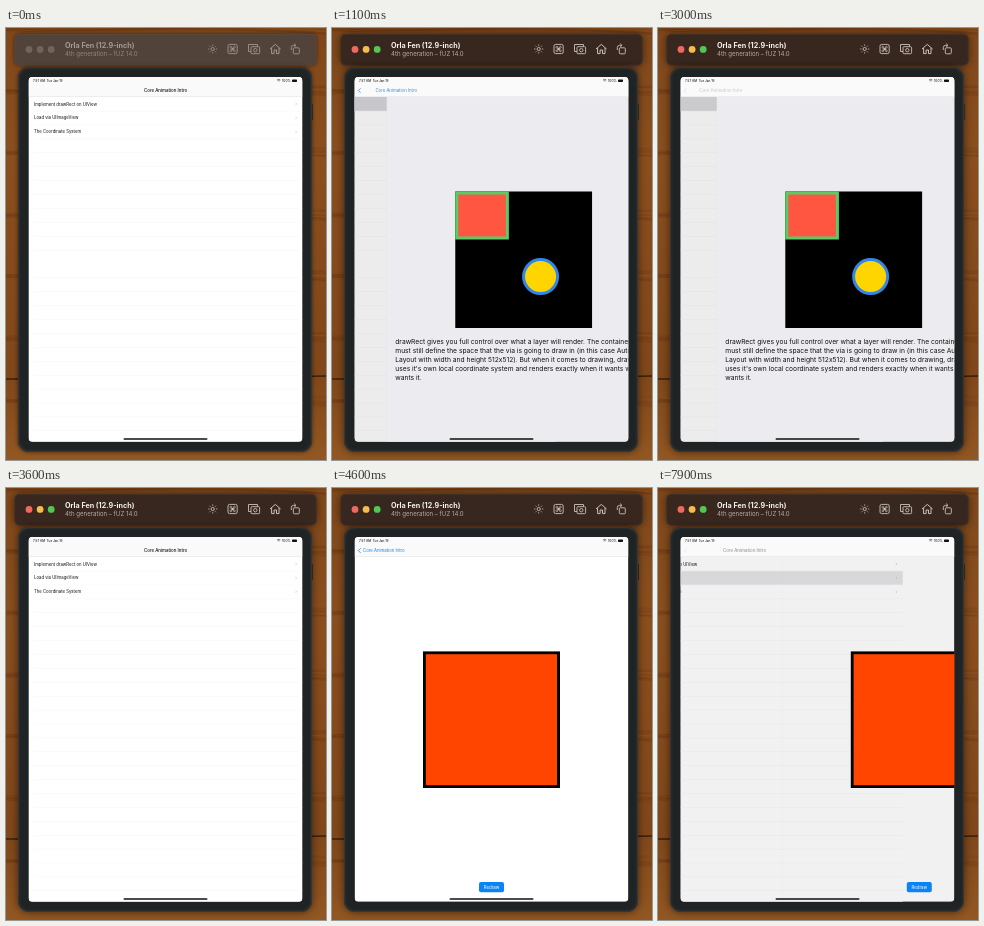
These frames come from a looping animation (320x432 px, 8000 ms). An HTML page with a canvas:

```html
<!DOCTYPE html>
<html lang="en">
<head>
<meta charset="utf-8">
<title>Tablet simulator</title>
<style>
html, body { margin: 0; width: 100%; height: 100%; overflow: hidden; background: #70430f; }
canvas { display: block; width: 320px; height: 432px; }
</style>
</head>
<body>
<canvas></canvas>
<script>
const W = 320, H = 432, LOOP = 8000, STEP = 100;
const SCREEN = { x: 22.6, y: 49, w: 273.8, h: 364.8 };
const NAV_BOTTOM = 69, ROW = 13.9;
const ROWS = ['Implement drawRect on UIView', 'Load via UIImageView', 'The Coordinate System'];
const PARAGRAPH = [
  'drawRect gives you full control over what a layer will render. The container',
  'must still define the space that the via is going to draw in (in this case Auto',
  'Layout with width and height 512x512). But when it comes to drawing, drawRect',
  "uses it's own local coordinate system and renders exactly when it wants what it",
  'wants it.'
];
const VISITS = [
  { row: 0, push: 895, pop: 2965, draw: drawShapes },
  { row: 1, push: 4095, pop: 7828, draw: drawImagePage }
];
const PRESSES = [[5000, 5200], [5600, 5800], [6400, 6500]];

const canvas = document.querySelector('canvas');
const scale = window.devicePixelRatio || 1;
canvas.width = W * scale;
canvas.height = H * scale;
const c = canvas.getContext('2d');

const spring = ms => {
  const x = Math.max(0, ms) * 0.018;
  return 1 - (1 + x) * Math.exp(-x);
};

function rect(x, y, w, h, fill) {
  c.fillStyle = fill;
  c.fillRect(x, y, w, h);
}

function round(x, y, w, h, r, fill, stroke, line = 1) {
  c.beginPath();
  c.roundRect(x, y, w, h, r);
  paint(fill, stroke, line);
}

function circle(x, y, r, fill, stroke, line = 1) {
  c.beginPath();
  c.arc(x, y, r, 0, 7);
  paint(fill, stroke, line);
}

function path(d, stroke, line = 1) {
  c.strokeStyle = stroke;
  c.lineWidth = line;
  c.stroke(new Path2D(d));
}

function paint(fill, stroke, line) {
  if (fill) { c.fillStyle = fill; c.fill(); }
  if (stroke) { c.strokeStyle = stroke; c.lineWidth = line; c.stroke(); }
}

function text(s, x, y, size, fill, weight = 400, align = 'left') {
  c.font = `${weight} ${size}px Inter, sans-serif`;
  c.textAlign = align;
  c.fillStyle = fill;
  c.fillText(s, x, y);
}

function withAlpha(alpha, draw) {
  c.save();
  c.globalAlpha *= Math.max(0, Math.min(1, alpha));
  draw();
  c.restore();
}

function withShadow(blur, draw) {
  c.save();
  c.shadowColor = 'rgba(0,0,0,.55)';
  c.shadowBlur = blur * scale;
  draw();
  c.restore();
}

function at(x, y, draw) {
  c.save();
  c.translate(x, y);
  draw();
  c.restore();
}

function drawDesk() {
  const g = c.createLinearGradient(0, 0, 0, H);
  g.addColorStop(0, '#80481a');
  g.addColorStop(0.3, '#8a4f1e');
  g.addColorStop(0.8, '#80471a');
  g.addColorStop(1, '#925722');
  rect(0, 0, W, H, g);
  for (let i = 0; i < 44; i++) {
    const y = (i * 61.8) % H;
    c.beginPath();
    c.moveTo(0, y);
    c.bezierCurveTo(100, y + 6 * Math.sin(i), 220, y - 5, W, y + 4 * Math.cos(i * 2));
    paint(null, i % 3 ? 'rgba(60,25,0,.1)' : 'rgba(200,125,55,.1)', 1 + i % 3);
  }
  path('M0 351H160L320 348', '#3a1f08', 1.6);
}

function drawIcons(color) {
  at(206.7, 21, () => {
    circle(0, 0, 1.6, null, color, 0.9);
    for (let i = 0; i < 8; i++) {
      const a = i * Math.PI / 4, dx = Math.cos(a), dy = Math.sin(a);
      path(`M${dx * 3.2} ${dy * 3.2}L${dx * 4.6} ${dy * 4.6}`, color, 0.8);
    }
  });
  at(226.6, 21, () => {
    round(-4.6, -4.6, 9.2, 9.2, 1.6, null, color, 0.9);
    rect(-1.2, -1.2, 2.4, 2.4, color);
    for (const dx of [-1.8, 1.8]) for (const dy of [-1.8, 1.8]) circle(dx, dy, 0.9, null, color, 0.7);
  });
  at(248, 21, () => {
    path('M-3 2.5H-5.5V-4.5H3.5V-2.5', color, 0.9);
    round(-3, -2.3, 8.6, 7, 1, null, color, 0.9);
    circle(1.3, 1.2, 1.7, null, color, 0.9);
  });
  at(269.3, 21, () => path('M-5.3 0L0 -4.6L5.3 0M-3.7 -1V4.6H-1.2V1H1.2V4.6H3.7V-1', color, 1));
  at(289.5, 21, () => {
    round(-2.2, -1.2, 6, 6, 1, null, color, 0.9);
    path('M-4.2 1V-1.5Q-4.2 -3.6 -2 -3.6H0M-1.4 -5.4L.5 -3.6L-1.4 -1.8', color, 0.9);
  });
}

function drawWindowBar(focused) {
  withShadow(focused ? 9 : 4, () => round(8.5, 6, 302, 31.5, 5, focused ? '#38271f' : '#51433a'));
  round(8.8, 6.3, 301.4, 30.9, 5, null, focused ? '#4a3a31' : '#5c4e45', 0.6);
  const lights = focused ? ['#f0695e', '#f5bd4f', '#54c652'] : ['#70645d', '#70645d', '#70645d'];
  lights.forEach((color, i) => circle(23 + i * 11.1, 21.4, 3.4, color));
  text('Orla Fen (12.9-inch)', 59, 20.4, 7.2, focused ? '#f4f1ef' : '#a39a94', 700);
  text('4th generation – fUZ 14.0', 59, 28.3, 6.1, focused ? '#b5aaa4' : '#8e847d');
  drawIcons(focused ? '#c9c1bc' : '#a0968f');
}

function drawDevice(focused) {
  withShadow(focused ? 9 : 4, () => round(12, 39, 294, 385, 11, '#222627'));
  round(305, 76, 2, 16, 1, '#292724');
  round(12.6, 39.6, 292.8, 383.8, 10.5, null, '#343637', 1.2);
  round(15, 42, 288, 379, 9, '#1f2324');
}

function drawList(x, selected, strength) {
  at(x, 0, () => {
    rect(SCREEN.x, SCREEN.y, SCREEN.w, SCREEN.h, '#fff');
    if (strength > 0) {
      withAlpha(strength, () => rect(SCREEN.x, NAV_BOTTOM + selected * ROW, SCREEN.w, ROW, '#d6d6db'));
    }
    for (let y = NAV_BOTTOM + ROW; y < 410; y += ROW) rect(28, y, SCREEN.w - 5, 0.4, '#f2f2f4');
    ROWS.forEach((label, i) => {
      const y = NAV_BOTTOM + (i + 0.5) * ROW;
      text(label, 28, y + 1.6, 4.25, '#111');
      path(`M289.4 ${y - 1.3}l1.3 1.3l-1.3 1.3`, '#b9b9bd', 0.5);
    });
  });
}

function drawShapes() {
  rect(SCREEN.x, SCREEN.y, SCREEN.w, SCREEN.h, '#ebebf0');
  rect(91.2, 163.5, 136.8, 136.5, '#000');
  rect(91.2, 163.5, 53.6, 48, '#5acb66');
  rect(94.2, 166.5, 47.6, 42, '#ff5641');
  circle(176.5, 248.6, 17, '#ffd500', '#3286e6', 3);
  PARAGRAPH.forEach((line, i) => text(line, 31.2, 315.6 + i * 9.05, 6.7, '#111'));
}

function drawImagePage(t) {
  rect(91, 163.4, 137, 136.6, '#000');
  rect(93.8, 166.2, 131.2, 131, '#ff4500');
  round(147, 394, 25, 10.3, 2, '#0a84f5');
  const pressed = PRESSES.some(([from, to]) => t >= from && t < to);
  text('Redraw', 159.5, 400.7, 4.4, pressed ? 'rgba(255,255,255,.35)' : '#fff', 400, 'center');
}

function drawNavBar(cover, visit, t) {
  rect(SCREEN.x, SCREEN.y, SCREEN.w, NAV_BOTTOM - SCREEN.y, '#fafafa');
  rect(SCREEN.x, NAV_BOTTOM - 0.4, SCREEN.w, 0.4, '#d8d8da');
  const title = 'Core Animation Intro';
  if (cover === 0) {
    text(title, 159.6, 64.2, 4.4, '#111', 500, 'center');
  } else {
    const popping = t >= visit.pop;
    const back = 1 - cover;
    const x = 31 + 106 * (popping ? back ** 1.15 : back);
    const held = t >= visit.pop - 150;
    withAlpha(popping ? cover * 0.25 : held ? 0.35 : cover, () => {
      path('M28.6 60.3L26.4 62.6L28.6 64.9', '#1683e8', 0.8);
      if (!popping) text(title, x, 64.2, 4.3, '#1683e8');
    });
    const titleAlpha = popping ? 0.05 + back * 0.95 : back * 2 - 1;
    withAlpha(titleAlpha, () => text(title, x, 64.2, 4.4, '#111', 500));
  }
  text('7:57 AM  Tue Jan 19', 27, 53.6, 3.1, '#222', 500);
  text('100%', 284.6, 53.7, 3.2, '#222', 500, 'right');
  path('M271 52Q272.7 50.7 274.4 52M271.8 53Q272.7 52.2 273.6 53', '#222', 0.6);
  round(286, 51.4, 5, 2.5, 0.7, '#111');
}

function drawScreen(t) {
  const visit = VISITS.find((v, i) => i === VISITS.length - 1 || t < VISITS[i + 1].push);
  const popping = t >= visit.pop;
  const settled = popping ? t - visit.pop >= 600 : t - visit.push >= 500;
  const pushed = spring(t - visit.push), popped = spring(t - visit.pop);
  const cover = popping ? (settled ? 0 : 1 - popped) : (settled ? 1 : pushed);
  const active = t >= visit.push && !(settled && popping);

  c.save();
  c.beginPath();
  c.roundRect(SCREEN.x, SCREEN.y, SCREEN.w, SCREEN.h, 4);
  c.clip();
  rect(SCREEN.x, SCREEN.y, SCREEN.w, SCREEN.h, '#fff');
  if (cover < 1) {
    const strength = !active ? 0 : popping ? cover : 1;
    drawList(-0.3 * SCREEN.w * cover, visit.row, strength);
    rect(SCREEN.x, SCREEN.y, SCREEN.w, SCREEN.h, `rgba(0,0,10,${0.085 * cover})`);
  }
  if (active) {
    at(SCREEN.w * (1 - cover), 0, () => {
      if (cover < 1) rect(SCREEN.x - 0.5, NAV_BOTTOM, 0.5, SCREEN.h, 'rgba(0,0,0,.03)');
      visit.draw(t);
    });
  }
  drawNavBar(active ? cover : 0, visit, t);
  round(117.5, 410.2, 84, 1.6, 0.8, '#111');
  c.restore();
}

function frame(now) {
  const t = Math.floor((now % LOOP) / STEP) * STEP;
  const focused = t >= 100;
  c.setTransform(scale, 0, 0, scale, 0, 0);
  drawDesk();
  drawWindowBar(focused);
  drawDevice(focused);
  drawScreen(t);
  requestAnimationFrame(frame);
}
frame(0);
</script>
</body>
</html>
```
